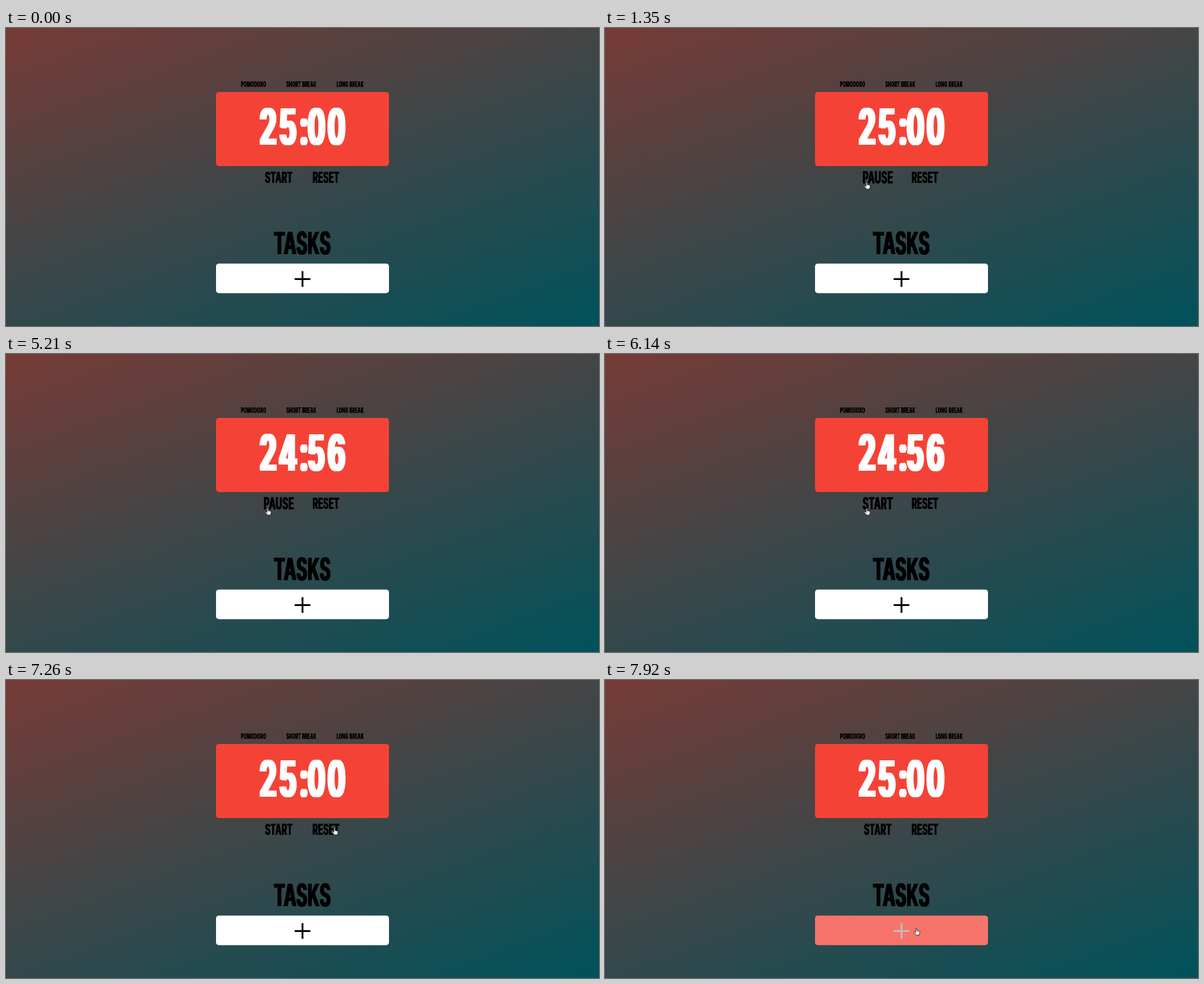
An HTML page that plays this animation: 1056x531 px, repeating every 7990 ms.

```html
<!DOCTYPE html>
<html lang="en">
<head>
<meta charset="utf-8">
<title>Pomodoro timer</title>
<style>
  html, body { margin: 0; width: 100%; height: 100%; overflow: hidden; }
  body {
    position: relative;
    background: linear-gradient(160deg, #773b36, #00525b);
    font: 700 27px/0 Inter, "Liberation Sans", sans-serif;
  }
  .text, svg { position: absolute; }
  svg { left: 0; top: 0; }
  /* one condensed, horizontally emboldened face for every label */
  .text {
    --bold: .04em;
    white-space: nowrap;
    letter-spacing: .03em;
    text-shadow: var(--bold) 0, calc(-1 * var(--bold)) 0;
    transform: translateX(-50%) scale(calc(.53 * var(--zoom, 1)), var(--zoom, 1));
  }
  .tab { top: 100.5px; font-size: 12.8px; letter-spacing: .07em; }
  .button { top: 267px; }
  #timer {
    --bold: .06em;
    left: 530px; top: 175.5px; color: #fff; font-size: 90px;
    letter-spacing: .1em; font-variant-numeric: tabular-nums;
  }
  #timer i { font-style: normal; font-variant-numeric: normal; letter-spacing: -.02em; }
  #title { left: 528px; top: 383px; font-size: 55px; }
  #cursor { fill: #fff; stroke: #111; stroke-width: .9; stroke-linejoin: round; }
</style>
</head>
<body>
<svg width="1056" height="531">
  <rect x="374" y="114" width="308" height="132" rx="5" fill="#f44336"/>
  <rect id="add" x="374" y="419.8" width="308" height="52.7" rx="5"/>
  <path id="plus" d="M514 447.3h28M528 433.3v28" stroke-width="3.2"/>
</svg>
<div class="text tab" style="left:441px">POMODORO</div>
<div class="text tab" style="left:525.5px">SHORT BREAK</div>
<div class="text tab" style="left:612.5px">LONG BREAK</div>
<div class="text" id="timer"></div>
<div class="text button" id="toggle" style="left:485.5px"></div>
<div class="text button" id="reset" style="left:570px">RESET</div>
<div class="text" id="title">TASKS</div>
<svg width="1056" height="531"><path id="cursor"/></svg>
<script>
const LOOP = 7990, STARTED = 1210, PAUSED = 6040, CLEARED = 7250;
const $ = id => document.getElementById(id);
const [timer, toggle, reset, add, plus, cursor] =
  ["timer", "toggle", "reset", "add", "plus", "cursor"].map($);

const ARROW = "M.5.5V12.3l2.9-2.6 1.8 3.8 1.7-.8-1.8-3.7H9z";
const HAND = "M-1 7.5V1.5a1 1 0 0 1 2 0V5.2l4 .9q1.4.4 1.2 1.9L5.2 13H0L-3.9 8.8q-.9-1.4.5-1.8.9-.1 2.4 1.6z";

// where the cursor rests, when it sets off, when it arrives, how far its way sags
const entry = { x: 982, y: 509 };
const stops = [
  { x: 466, y: 274, from: 100, to: 800, sag: 0 },
  { x: 585, y: 263, from: 6420, to: 6800, sag: 19 },
  { x: 554.5, y: 441.5, from: 7540, to: 7920, sag: 0 }
];

const ramp = (t, from, length) => Math.max(0, Math.min(1, (t - from) / length));
const ease = p => p * p * (3 - 2 * p);
const mix = (a, b, p) => `rgb(${a.map((v, i) => Math.round(v + (b[i] - v) * p))})`;
const within = (x, y, l, t, r, b) => x >= l && x <= r && y >= t && y <= b;

function cursorAt(t) {
  let { x, y } = entry, last = entry;
  for (const stop of stops) {
    const p = ease(ramp(t, stop.from, stop.to - stop.from));
    x += (stop.x - last.x) * p;
    y += (stop.y - last.y) * p + stop.sag * Math.sin(Math.PI * p);
    last = stop;
  }
  return [x, y];
}

// hovered buttons grow by a tenth and shrink back while pressed
const hover = (t, enter, leave) => ramp(t, enter, 150) - ramp(t, leave, 130);
const press = (t, click) => ramp(t, click - 160, 100) - ramp(t, click, 100);
const zoom = (el, amount) => el.style.setProperty("--zoom", 1 + amount / 10);

function draw() {
  const t = performance.now() % LOOP;

  const ticks = Math.floor((Math.min(t, PAUSED) - STARTED) / 1000);
  const left = 1500 - (t < CLEARED ? Math.max(0, ticks) : 0);
  const clock = `${Math.floor(left / 60)}<i>:</i>${String(left % 60).padStart(2, "0")}`;
  if (timer.innerHTML !== clock) timer.innerHTML = clock;

  toggle.textContent = t >= STARTED && t < PAUSED ? "PAUSE" : "START";
  zoom(toggle, hover(t, 650, 6480) - press(t, STARTED) - press(t, PAUSED));
  zoom(reset, hover(t, 6650, 7590) - press(t, CLEARED));

  const tint = .74 * ramp(t, 7790, 130);
  add.style.fill = mix([255, 255, 255], [244, 67, 54], tint);
  plus.style.stroke = mix([0, 0, 0], [255, 255, 255], tint);

  const [x, y] = cursorAt(t);
  const over = within(x, y, 457, 253, 514, 282) || within(x, y, 542, 253, 598, 282) ||
    within(x, y, 374, 420, 682, 473);
  cursor.setAttribute("d", over ? HAND : ARROW);
  cursor.setAttribute("transform", `translate(${x} ${y})`);
  cursor.style.visibility = t < 130 ? "hidden" : "visible";
  requestAnimationFrame(draw);
}
draw();
</script>
</body>
</html>
```
